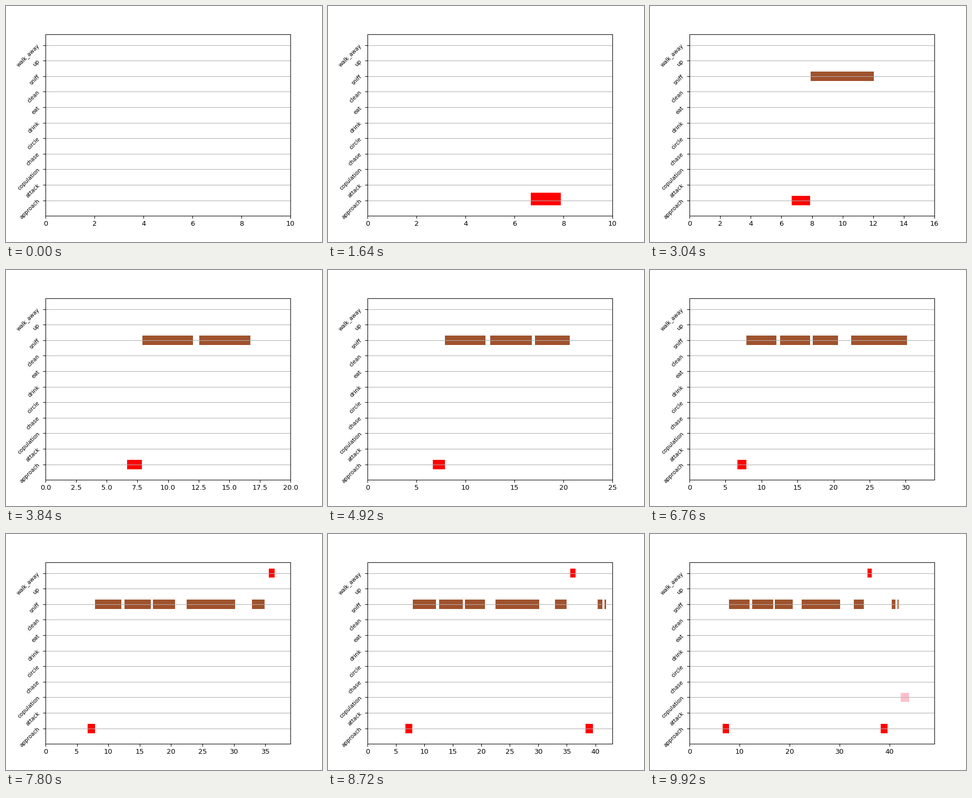
A matplotlib script that plays this animation: 600x450 px, repeating every 10 s.

```python
import math

import matplotlib.pyplot as plt
from matplotlib.animation import FuncAnimation
from matplotlib.patches import Rectangle

FRAMES, INTERVAL = 250, 40
STEP = 0.192          # chart seconds per frame
LEAD = 1.572          # how far the axis end runs ahead of the clock
SLACK = 0.03          # a bar may end this far past the clock
THIN_FROM = 68        # bars are taller before this frame

ROWS = ["approach", "attack", "copulation", "chase", "circle", "drink",
        "eat", "clean", "sniff", "up", "walk_away"]
COLORS = {"approach": "red", "walk_away": "red",
          "sniff": "sienna", "copulation": "pink"}
EVENTS = [
    ("approach", 6.67, 7.89),
    ("sniff", 7.92, 12.06),
    ("sniff", 12.55, 16.75),
    ("sniff", 17.12, 20.62),
    ("sniff", 22.44, 30.17),
    ("sniff", 32.91, 34.93),
    ("walk_away", 35.58, 36.51),
    ("approach", 38.3, 39.59),
    ("sniff", 40.42, 41.25),
    ("sniff", 41.62, 41.88),
    ("copulation", 42.25, 43.95),
]

# 600 x 450 pixels
fig, ax = plt.subplots(figsize=(6.4, 4.8), dpi=93.75)
fig.subplots_adjust(left=0.125, right=0.9, bottom=0.1104, top=0.8804)
ax.set_ylim(-1, 10.7)
ax.set_yticks(range(len(ROWS)), ROWS, fontsize=8, rotation=45)
ax.grid(axis="y")

bars = []
for name, start, end in EVENTS:
    bar = Rectangle((start, ROWS.index(name) - 0.3), end - start, 0.6,
                    facecolor=COLORS[name], linewidth=0)
    ax.add_patch(bar)
    bars.append((bar, end))


def draw(frame):
    clock = frame * STEP
    ax.set_xlim(0, max(10, math.floor(clock + LEAD)))
    for bar, end in bars:
        bar.set_visible(end <= clock + SLACK)
        bar.set_height(0.8 if frame < THIN_FROM else 0.6)
    return [bar for bar, _ in bars]


anim = FuncAnimation(fig, draw, frames=FRAMES, interval=INTERVAL,
                     init_func=lambda: draw(0), repeat=True, repeat_delay=0)
plt.show()
```
